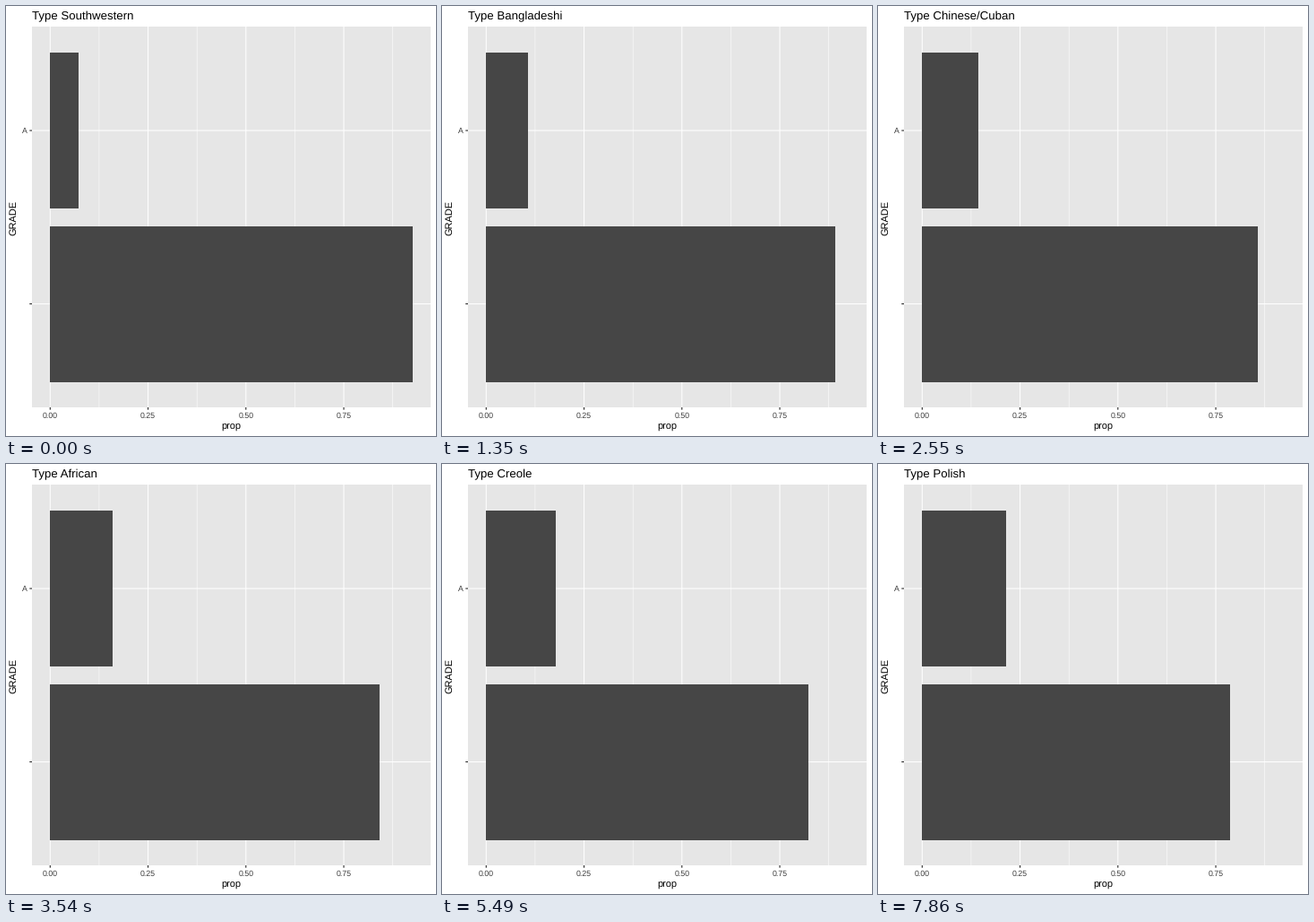
A matplotlib script that plays this animation: 480 by 480 pixels, repeating every 8000 ms.

```python
import matplotlib.pyplot as plt
from matplotlib.animation import FuncAnimation
from matplotlib.patches import Rectangle

SIZE, DPI = 480, 100
LOOP, INTERVAL = 8000, 20
STEP = 30                        # time between two poses, ms
START, PERIOD, MOVE = 90, 540, 360

LEFT, RIGHT, TOP, BOTTOM = 29, 474, 23, 448
X0, UNIT = 49.3, 437             # pixel of zero, pixels per unit of prop
Y_A, Y_BLANK = 139, 332.5
PANEL, BAR, TICK, LABEL = "#e6e6e6", "#464646", "#232323", "#3c3c3c"

# cuisine and its share of grade A
STATES = [
    ("Southwestern", 0.0732),
    ("Californian", 0.1009),
    ("Bangladeshi", 0.1041),
    ("Pakistani", 0.1103),
    ("Creole/Cajun", 0.1169),
    ("Chinese/Cuban", 0.1490),
    ("Chilean", 0.15808),
    ("African", 0.15858),
    ("Indian", 0.1677),
    ("Peruvian", 0.1721),
    ("Creole", 0.17677),
    ("Korean", 0.1863),
    ("Vietnamese/Cambodian/Malaysia", 0.2094),
    ("Spanish", 0.2130),
    ("Eastern European", 0.21357),
    ("Polish", 0.2151),
]

plt.rcParams.update({
    "font.family": "Liberation Sans",
    "text.hinting": "none",
    "toolbar": "None",
})

fig = plt.figure(figsize=(SIZE / DPI, SIZE / DPI), dpi=DPI, facecolor="white")
ax = fig.add_axes([0, 0, 1, 1])
ax.set(xlim=(0, SIZE), ylim=(SIZE, 0))
ax.axis("off")


def px(size):
    """Pixels to points."""
    return size * 72 / DPI


def x_pos(value):
    return X0 + UNIT * value


def line(xs, ys, color, width, z):
    ax.plot(xs, ys, color=color, lw=px(width), solid_capstyle="butt",
            snap=False, zorder=z)


def label(x, y, text, size, color="black", **kw):
    return ax.text(x, y, text, fontsize=px(size), color=color,
                   va="baseline", zorder=5, **kw)


def rect(x, y, w, h, color, z):
    return ax.add_patch(Rectangle((x, y), w, h, fc=color, lw=0,
                                  antialiased=False, zorder=z))


rect(LEFT, TOP, RIGHT - LEFT, BOTTOM - TOP, PANEL, 0)

for i in range(4):
    x = x_pos(i / 4)
    minor = x_pos(i / 4 + 0.125)
    line([minor, minor], [TOP, BOTTOM], "white", 0.53, 1)
    line([x, x], [TOP, BOTTOM], "white", 1.07, 2)
    line([x, x], [BOTTOM, BOTTOM + 2.7], TICK, 1.07, 2)
    label(x, 460, f"{i / 4:.2f}", 8.8, LABEL, ha="center")

for y in (Y_A, Y_BLANK):
    line([LEFT, RIGHT], [y, y], "white", 1.07, 2)
    line([LEFT - 2.7, LEFT], [y, y], TICK, 1.07, 2)

label(24, 142.5, "A", 8.8, LABEL, ha="right")
label((LEFT + RIGHT) / 2, 473, "prop", 11, ha="center")
ax.text(13.5, 236, "GRADE", fontsize=px(11), rotation=90,
        ha="right", va="center", zorder=5)
title = label(LEFT, 15, "", 13.2)

bar_a = rect(49, 52, 0, 174, BAR, 3)
bar_blank = rect(49, 246, 0, 174, BAR, 3)


def update(frame):
    t = (frame * INTERVAL + 10) // STEP * STEP
    k = max(0, (t - START) // PERIOD)
    f = min(1, max(0, (t - START - k * PERIOD) / MOVE))
    (name, share), (next_name, next_share) = STATES[k:k + 2]
    share += (next_share - share) * f
    bar_a.set_width(round(x_pos(share)) - 49)
    bar_blank.set_width(round(x_pos(1 - share)) - 49)
    title.set_text("Type " + (next_name if f > 0.5 else name))
    return bar_a, bar_blank, title


anim = FuncAnimation(fig, update, frames=LOOP // INTERVAL, interval=INTERVAL,
                     repeat=True, repeat_delay=0, blit=False)
plt.show()
```
